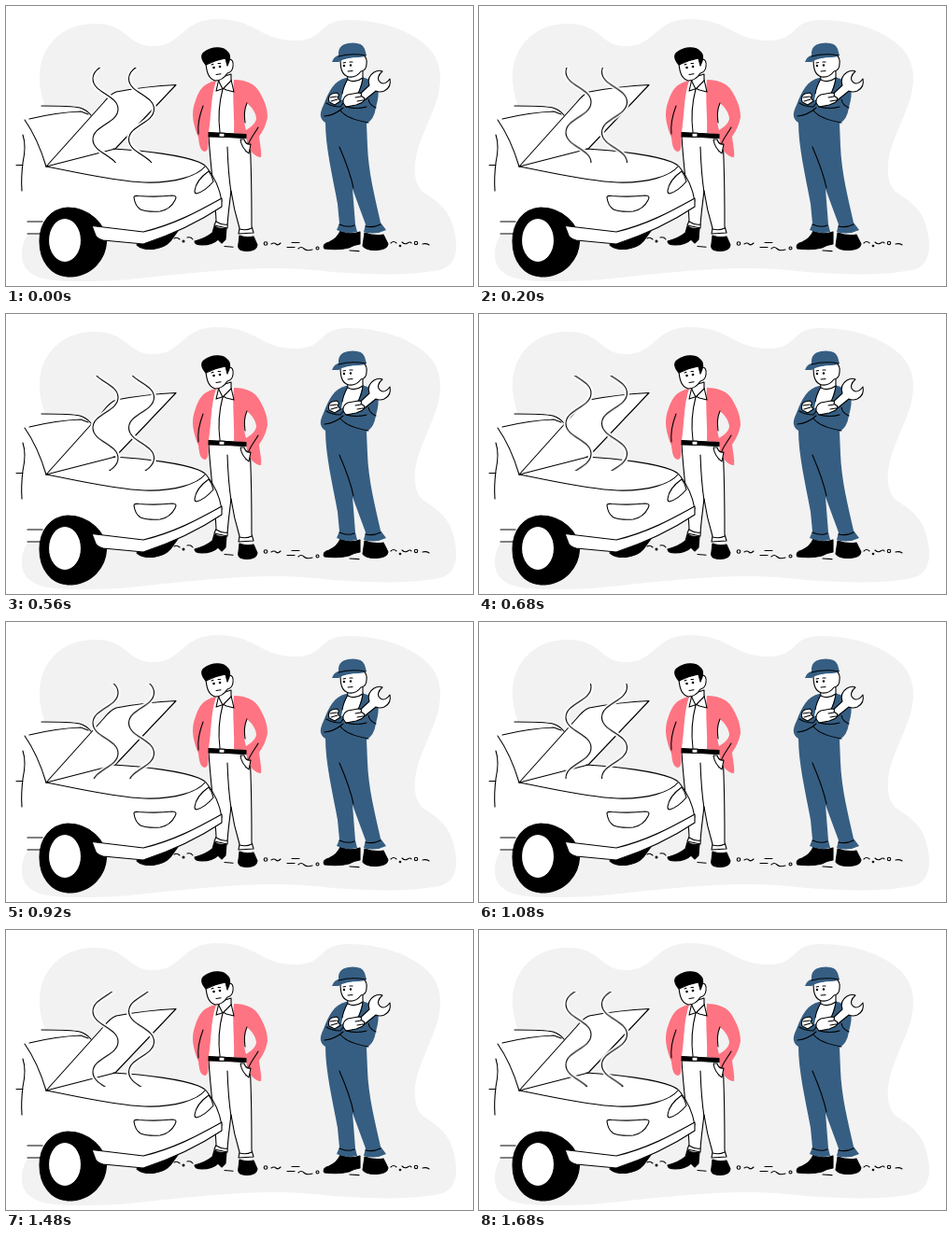
An HTML page for the animation above (1.72 s loop, 500 px wide and 300 px high).

```html
<!DOCTYPE html>
<html lang="en">
<head>
<meta charset="utf-8">
<title>Breakdown</title>
<style>
  html, body { margin: 0; width: 100%; height: 100%; overflow: hidden; background: #fff; }
  svg { display: block; width: 500px; height: 300px; }
  .ink { fill: none; stroke: #000; stroke-width: 1.1; stroke-linecap: round; stroke-linejoin: round; }
  .ink .w { fill: #fff; }
  .ink .b { fill: #000; }
  .flat { stroke: none; }
  .pink { fill: #ff7482; }
  .blue { fill: #365e82; }
  .grey { fill: #f2f2f2; }
  .halo { fill: none; stroke: #fff; stroke-width: 5; }
  .rise { animation: rise 1720ms steps(43) infinite; }
  @keyframes rise { to { transform: translateY(-65px); } }
</style>
</head>
<body>
<svg viewBox="0 0 500 300">
  <defs>
    <clipPath id="plume"><rect x="85" y="66" width="80" height="101.5"/></clipPath>
    <path id="wave" d="M93 13c0 15 27 17.500 27 32.500s-27 17.500-27 32.500s27 17.500 27 32.500s-27 17.500-27 32.500s27 17.500 27 32.500s-27 17.500-27 32.500s27 17.500 27 32.500s-27 17.500-27 32.500"/>
    <g id="strand">
      <use href="#wave" class="halo"/>
      <use href="#wave" class="ink"/>
    </g>
  </defs>

  <path class="grey" d="M36 72C38 42 60 20 92 19C130 17 129 43 157 43C190 43 186 15 225 14C268 14 272 37 310 37C342 37 333 16 364 15C400 14 443 28 458 52C475 80 457 112 446 139C436 163 434 187 446 199C458 207 473 216 478 234C485 256 484 276 467 282C430 291 370 287 330 283C285 279 245 282 200 286C150 290 125 296 75 295C38 295 17 289 17 266C17 244 33 238 41 210C52 175 58 158 49 128C43 108 35 95 36 72Z"/>

  <!-- ground -->
  <g class="ink">
    <path d="M180 249q3-2 6 1M194 248q4-1 6 2M234 257.500l9 .8M284 255q3-2 5 0t5-1M306 253.500h8M301 258.500h8M313 260q3-3 6 0t9 1M368 262l10 .6M412 254q3-3 6 0M424 253q3 3 6 1t4 0M446 255q4-1 7 1"/>
    <circle cx="190" cy="252" r="1"/>
    <circle cx="278" cy="254.500" r="1.800"/>
    <circle cx="333.500" cy="259.500" r="1.500"/>
    <circle cx="422" cy="257" r=".8"/>
    <circle cx="439" cy="254" r="1.700"/>
  </g>

  <!-- driver -->
  <g class="ink">
    <path class="w" d="M217 139L261 142C263 175 263 210 263 236L265 243L249 244L250 238C246 225 243 212 241 198C239 215 237 228 237 238L223 235L225 230C224 205 219 175 217 139Z"/>
    <path d="M237 151Q238 180 241 200M225 231q6 4 12 3M250 239q7 2 13-1"/>
    <path class="b" d="M223 236Q230 240 236 238L235 250L231 254L227 250Q221 256 210 256Q202 256 202 252Q214 249 221 243ZM250 246Q257 249 265 247L269 256Q268 263 257 262.500Q247 262 249 255Z"/>
    <path class="w flat" d="M222 82L243 80L246 138L217 137Z"/>
    <path class="pink flat" d="M225 80C210 83 207 91 203 101C197 116 201 128 206 141C207 150 208 155 213 156C218 155 216 145 217 135C220 116 219 98 225 80ZM244 79C257 79 265 83 270 90C277 101 280 110 280 119C278 130 274 135 271 140C272 149 274 157 273 162C266 162 261 155 258 147L257 138L244 136C245 119 242 101 244 79Z"/>
    <path class="grey flat" d="M258 104C263 108 268 115 268 121C267 126 262 130 257 133C254 124 254 112 258 104Z"/>
    <path d="M211 107C206 120 205 128 206 137M258 104Q254 113 256 125M270 130C265 139 259 144 257 156"/>
    <path class="b" d="M217 135.500L257 137.500V141L217 140Z"/>
    <path class="w" d="M228 136v4l6 .3v-4Z"/>
    <path class="w" d="M251 143Q252 152 260 158L262 148Q257 149 255 143Z"/>
    <path d="M232 89Q226 112 229 135"/>
    <path class="w" d="M228 78L225 91L231 89M241 79L244 92L236 90L232 88"/>
    <path class="w" d="M228 77L228 81L232 89L241 80V73Z"/>
    <path class="w" d="M214 58C214 69 216 78 224 80Q232 80 237 72Q242 71 243 65Q244 57 239 57L236 50L215 52Z"/>
    <path class="b" d="M214 63C209 57 208 52 213 49C220 44 232 43 237 49Q241 53 239 59L237 64L235 56C229 57 222 59 214 63Z"/>
    <path d="M220 63l2-.7M227 61.500l2.500 0M225 73.500l5-.8"/>
    <g fill="#000" class="flat"><circle cx="222.500" cy="66" r="1.300"/><circle cx="229" cy="65" r="1.300"/></g>
  </g>

  <!-- car -->
  <g class="ink">
    <path class="b" d="M140 256C148 263 167 262 176 252L184 241L150 250Z"/>
    <path class="w flat" d="M20 123L38 107L77 108L92 120L43 172L115 153C150 155 190 160 212 171C223 180 229 197 231 210V215C205 231 180 243 147 255L104 251L36 245H23L16 198Z"/>
    <path d="M38 107C55 107 70 107 79 109Q86 111 91 117"/>
    <path d="M25 121Q54 114 80 113L88 116M20 122Q34 142 43 172M18 138Q22 150 18 168Q16 185 17 198M11 170.500h7M23 231h16M23 244h14"/>
    <path class="w" d="M43 172L104 104Q112 94 118 92Q150 86 182 84.500L117 153Z"/>
    <path d="M115 153C150 155 188 160 206 167Q213 170 215 173C223 183 229 197 231 209"/>
    <path d="M43 172C75 178 117 188 148 189C181 190 205 182 213 172"/>
    <path class="w" d="M137 205Q137 203 142 203.500Q162 205 178 203Q184 203 181 208Q176 218 165 220Q152 221 144 218Q138 214 137 205Z"/>
    <path class="w" d="M202 198C203 190 210 182 217 177Q221 182 222 188C217 194 211 199 204 201Q202 201 202 198Z"/>
    <path class="b" d="M66 216C90 216 107 235 107.500 252C107 270 93 290 66 290C48 289 36 273 36 252C36 232 48 217 66 216Z"/>
    <ellipse class="w" cx="63" cy="251" rx="17.500" ry="23.500"/>
    <path class="w" d="M92 235.500L147 242C180 234 204 221 231 206V215C207 231 181 244 147 255L104 251Q97 249 96 246Z"/>
  </g>

  <!-- mechanic -->
  <g class="ink">
    <path class="b" d="M358 241Q368 246 379 242L379 255Q372 256 367 259Q357 262 341 260Q338 255 346 253Q355 249 358 241ZM384 243Q395 247 404 245L409 255Q408 261 397 261.500Q385 262 382 257Z"/>
    <path class="blue flat" d="M364 77C351 80 346 91 340 106C335 116 336 121 342 125C342 150 349 180 355 212L357 233L354 240Q364 245 376 242L374 234L371 196L385 234L383 242Q395 246 407 240L401 232C395 205 388 178 387 150L386 126Q394 122 396 109Q400 95 398 88Q394 79 381 76Z"/>
    <path d="M357 151C363 165 369 180 372 195M357 234q9 4 16 1M385 236q8 2 16-2"/>
    <path class="w flat" d="M366 77L361 90L359 101L377 94L382 77Z"/>
    <path d="M366 78Q361 87 360 94M382 77Q381 87 376 95"/>
    <path class="w" d="M365 69L366 79Q374 83 382 77L382 66Z"/>
    <path class="w" d="M358 56C358 66 359 74 367 76Q375 77 380 70Q386 69 386 62Q387 56 383 53Z"/>
    <path class="blue flat" d="M349 60Q351 54 356 53Q355 42 366 40Q381 38 384 46L386 53Q382 55 378 55Q364 55 356 60Z"/>
    <path d="M356 54Q370 50 385 53M361 61l2.500-.5M368 60h3M366 70l5-.5"/>
    <g fill="#000" class="flat"><circle cx="362" cy="64" r="1.200"/><circle cx="369" cy="63.500" r="1.200"/></g>
    <path class="w" d="M375 98L389 85Q386 76 394 71Q399 68 403 70C398 74 397 79 401 82C404 84 408 82 411 78Q413 87 405 91Q400 93 396 91L380 104Z"/>
    <path class="w" d="M346 103Q344 96 349 94L354 93Q358 95 355 98L358 102L352 106ZM361 104Q360 98 366 95L377 93Q382 93 380 96L384 99L382 103L375 106L364 108Z"/>
    <path d="M347 98l7-1M348 102l7-2M374 98l6-1M376 102l6-1"/>
    <path d="M343 104Q349 108 358 108L361 104M341 118Q352 117 361 109M358 112Q365 121 388 125M364 108Q376 111 386 108M388 100Q389 106 396 109"/>
  </g>

  <g clip-path="url(#plume)">
    <g class="rise">
      <use href="#strand"/>
      <use href="#strand" x="38.500"/>
    </g>
  </g>
</svg>
</body>
</html>
```
